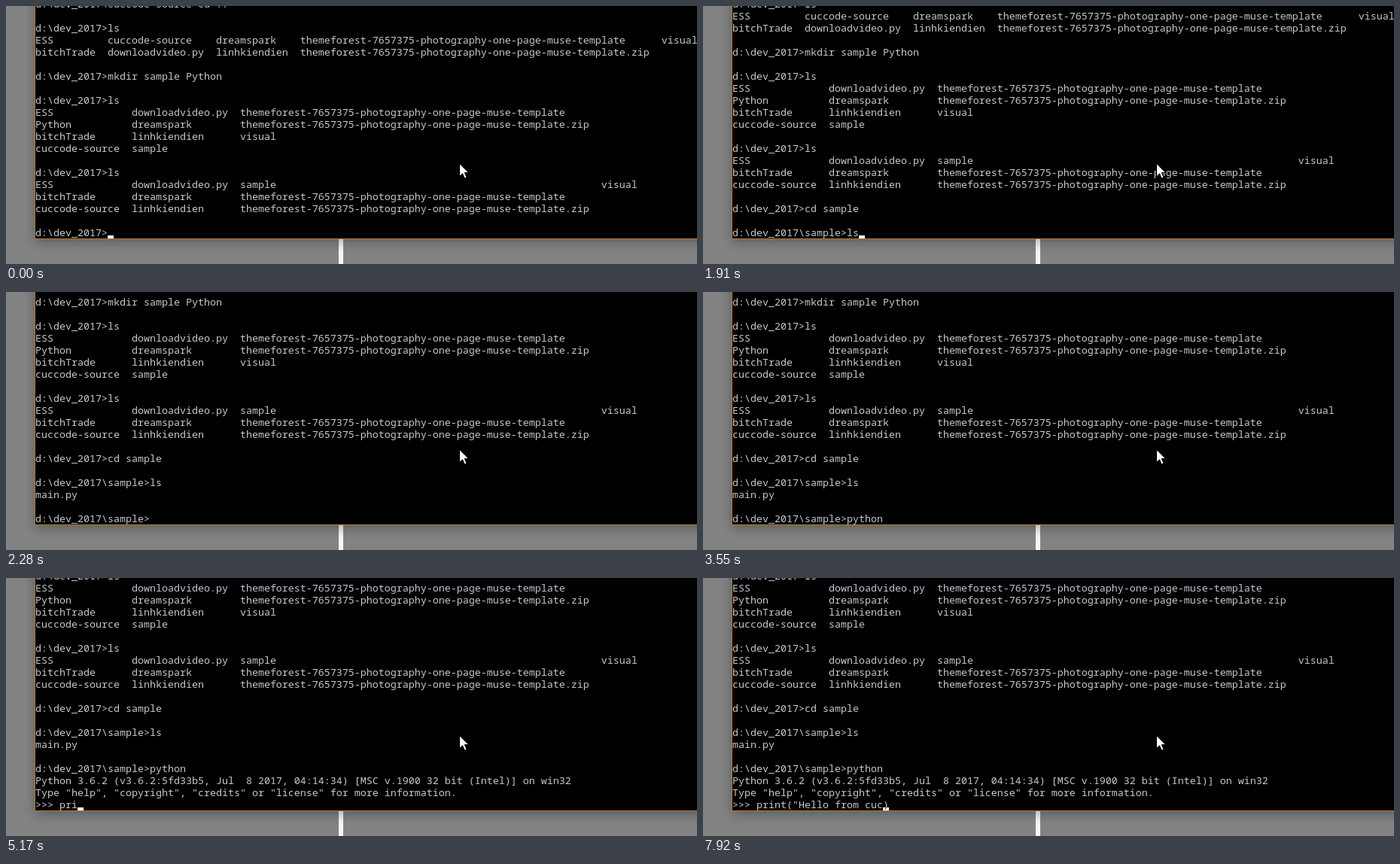
An HTML page for the animation above (8 s loop, 918 px wide and 343 px high).

```html
<!DOCTYPE html>
<html lang="en">
<head>
<meta charset="utf-8">
<title>Terminal session</title>
<style>
html, body { margin: 0; width: 100%; height: 100%; overflow: hidden; background: #808080; }
svg { display: block; width: 918px; height: 343px; }
text { font: 13.3333px "Noto Sans Mono", "DejaVu Sans Mono", monospace; fill: #c4cace; white-space: pre; }
#caret { fill: #fff; mix-blend-mode: difference; }
</style>
</head>
<body>
<svg viewBox="0 0 918 343" xmlns="http://www.w3.org/2000/svg">
  <defs>
    <filter id="blur" x="-10%" y="-20%" width="120%" height="140%"><feGaussianBlur stdDeviation="8"/></filter>
    <clipPath id="pane"><rect x="39" y="0" width="879" height="309"/></clipPath>
  </defs>
  <rect width="918" height="343" fill="#838383"/>
  <rect x="442" y="300" width="6" height="43" fill="#f6f6f6"/>
  <rect x="38" y="-60" width="960" height="374" fill="#000" opacity=".3" filter="url(#blur)"/>
  <rect x="38" y="-2" width="900" height="312" fill="#a8784a"/>
  <rect x="39" y="-2" width="900" height="311" fill="#000"/>
  <g id="rows" clip-path="url(#pane)"></g>
  <rect id="caret" y="305" width="8" height="4"/>
  <path d="M602.5 209.5V226.5L606.5 222.8L609.2 229L612 227.8L609.3 221.6H614.5Z" fill="#fff" stroke="#000" stroke-width="1"/>
</svg>
<script>
const LOOP = 8000, CELL = 8, LINE = 16, LEFT = 39, BASE = 306, ROWS = 20;
const HOME = "d:\\dev_2017>", SUB = "d:\\dev_2017\\sample>", REPL = ">>> ";
const THEME = "themeforest-7657375-photography-one-page-muse-template";

// Lays out words at the given column stops.
const cols = (stops, ...words) =>
  words.reduce((line, word, i) => line.padEnd(stops[i]) + word, "");
const A = [0, 12, 30, 44, 104], B = [0, 16, 34, 94];

const log = [
  "d:\\dev_2017\\cuccode-source>cd ..",
  "",
  HOME + "ls",
  cols(A, "ESS", "cuccode-source", "dreamspark", THEME, "visual"),
  cols(A, "bitchTrade", "downloadvideo.py", "linhkiendien", THEME + ".zip"),
  "",
  HOME + "mkdir sample Python",
  "",
  HOME + "ls",
  cols(B, "ESS", "downloadvideo.py", THEME),
  cols(B, "Python", "dreamspark", THEME + ".zip"),
  cols(B, "bitchTrade", "linhkiendien", "visual"),
  cols(B, "cuccode-source", "sample"),
  "",
  HOME + "ls",
  cols(B, "ESS", "downloadvideo.py", "sample", "visual"),
  cols(B, "bitchTrade", "dreamspark", THEME),
  cols(B, "cuccode-source", "linhkiendien", THEME + ".zip"),
  "",
  HOME + "cd sample",
  "",
  SUB + "ls",
  "main.py",
  "",
  SUB + "python",
  "Python 3.6.2 (v3.6.2:5fd33b5, Jul  8 2017, 04:14:34) [MSC v.1900 32 bit (Intel)] on win32",
  'Type "help", "copyright", "credits" or "license" for more information.'
];

// Each step: start time, finished lines, current line, caret distance from line end (OFF hides it).
const OFF = -1;
const steps = [];
const add = (done, prompt, ...keys) =>
  keys.forEach(([at, typed, caret = 0]) => steps.push([at, done, prompt + typed, caret]));

add(19, HOME, [0, ""], [680, "cd"], [1030, "cd s"], [1190, "cd sa"],
  [1350, "cd samp", OFF], [1720, "cd sample"]);
add(21, SUB, [1910, "ls"]);
add(22, "", [2100, ""]);
add(24, SUB, [2280, "", OFF], [2470, ""], [2650, "p"], [2840, "p", OFF],
  [3210, "py", OFF], [3370, "pyth", OFF], [3550, "python", OFF]);
add(27, REPL, [3890, ""], [4440, "", OFF], [4810, "p"], [4990, "pr"], [5170, "pri"],
  [5350, "print"], [5520, "print()"], [5690, "print()", 1]);
const say = [[5860, ""], [6230, "H"], [6420, "He"], [6610, "Hel"], [6810, "Hell"], [7000, "Hello"],
  [7190, "Hello f"], [7370, "Hello fro"], [7550, "Hello from "], [7740, "Hello from c"],
  [7920, "Hello from cuc"]];
add(27, REPL, ...say.map(([at, s]) => [at, `print("${s})`, 1]));

const group = document.getElementById("rows");
const caretBox = document.getElementById("caret");
const rows = Array.from({ length: ROWS }, (_, i) => {
  const row = document.createElementNS("http://www.w3.org/2000/svg", "text");
  row.setAttribute("x", LEFT);
  row.setAttribute("y", BASE - LINE * i);
  return group.appendChild(row);
});

let shown;
function draw(t) {
  const step = steps.findLast(s => s[0] <= t);
  if (step === shown) return;
  shown = step;
  const [, done, line, caret] = step;
  rows.forEach((row, i) => {
    row.textContent = i ? log[done - i] || "" : line;
  });
  caretBox.setAttribute("visibility", caret === OFF ? "hidden" : "visible");
  caretBox.setAttribute("x", LEFT + CELL * (line.length - Math.max(caret, 0)));
}

const start = performance.now();
function tick() {
  draw((performance.now() - start) % LOOP);
  requestAnimationFrame(tick);
}
draw(0);
requestAnimationFrame(tick);
</script>
</body>
</html>
```
